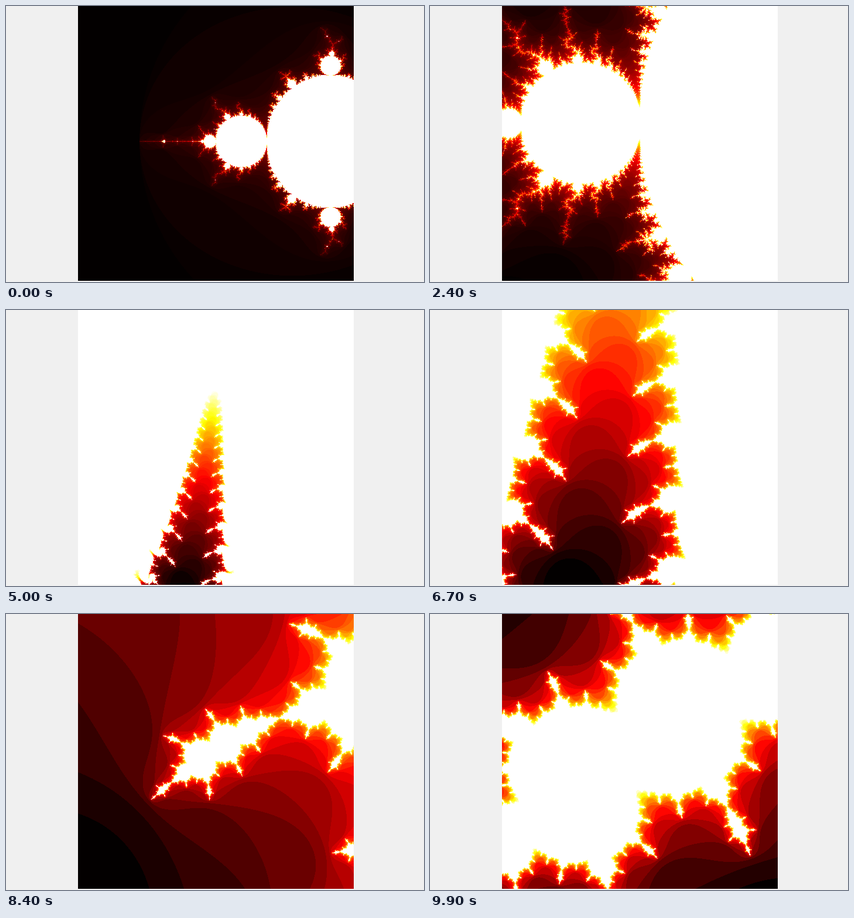
An HTML page with a canvas that plays this animation: 714x472 px, repeating every 10000 ms.

```html
<!DOCTYPE html>
<html lang="en">
<head>
<meta charset="utf-8">
<title>Fractal zoom</title>
<style>
  html, body { margin: 0; width: 100%; height: 100%; overflow: hidden; background: #f0f0f0; }
  canvas { position: absolute; left: 123px; top: 0; }
</style>
</head>
<body>
<canvas id="view" width="471" height="470"></canvas>
<script>
const STEPS = 100, STEP_MS = 100;
const MAX_ITER = 100;
const CENTER = { re: -1.25066, im: 0.02012 };
const START_SPAN = 2.7, ZOOM = 1.1;

const canvas = document.getElementById('view');
const ctx = canvas.getContext('2d');
const W = canvas.width, H = canvas.height;
const image = ctx.createImageData(W, H);
const pixels = new Uint32Array(image.data.buffer);
const cache = [];

const clamp = v => Math.max(0, Math.min(1, v));

// Black, red, yellow, white ramp packed as ABGR
const palette = Uint32Array.from({ length: 256 }, (_, i) => {
  const r = Math.round(255 * clamp((i + 1) / 96));
  const g = Math.round(255 * clamp((i - 95) / 96));
  const b = Math.round(255 * clamp((i - 191) / 64));
  return (255 << 24 | b << 16 | g << 8 | r) >>> 0;
});

function escapeCount(re, im) {
  const im2 = im * im;
  // Known interior: period-2 disc and main cardioid
  if ((re + 1) * (re + 1) + im2 < 0.0625) return MAX_ITER;
  const p = re - 0.25, q = p * p + im2;
  if (q * (q + p) < 0.25 * im2) return MAX_ITER;

  let x = 0, y = 0, xx = 0, yy = 0, n = 0;
  while (n < MAX_ITER) {
    y = 2 * x * y + im;
    x = xx - yy + re;
    xx = x * x;
    yy = y * y;
    if (xx + yy > 4) break;
    n++;
  }
  return n;
}

function compute(step) {
  const counts = new Uint8Array(W * H);
  const span = START_SPAN / ZOOM ** step;
  const dx = span / (W - 1), dy = span / (H - 1);
  const left = CENTER.re - span / 2, top = CENTER.im - span / 2;
  for (let j = 0, k = 0; j < H; j++) {
    for (let i = 0; i < W; i++) counts[k++] = escapeCount(left + i * dx, top + j * dy);
  }
  return counts;
}

function draw(step) {
  const counts = cache[step] || (cache[step] = compute(step));
  let lo = MAX_ITER, hi = 0;
  for (const n of counts) {
    if (n < lo) lo = n;
    if (n > hi) hi = n;
  }
  const scale = 256 / Math.max(1, hi - lo);
  for (let k = 0; k < counts.length; k++) {
    pixels[k] = palette[Math.min(255, Math.floor((counts[k] - lo) * scale))];
  }
  ctx.putImageData(image, 0, 0);
}

const start = performance.now();
let shown = -1;

function tick() {
  const elapsed = Math.max(0, performance.now() - start);
  const step = Math.floor(elapsed / STEP_MS) % STEPS;
  if (step !== shown) draw(shown = step);
  requestAnimationFrame(tick);
}
tick();
</script>
</body>
</html>
```
